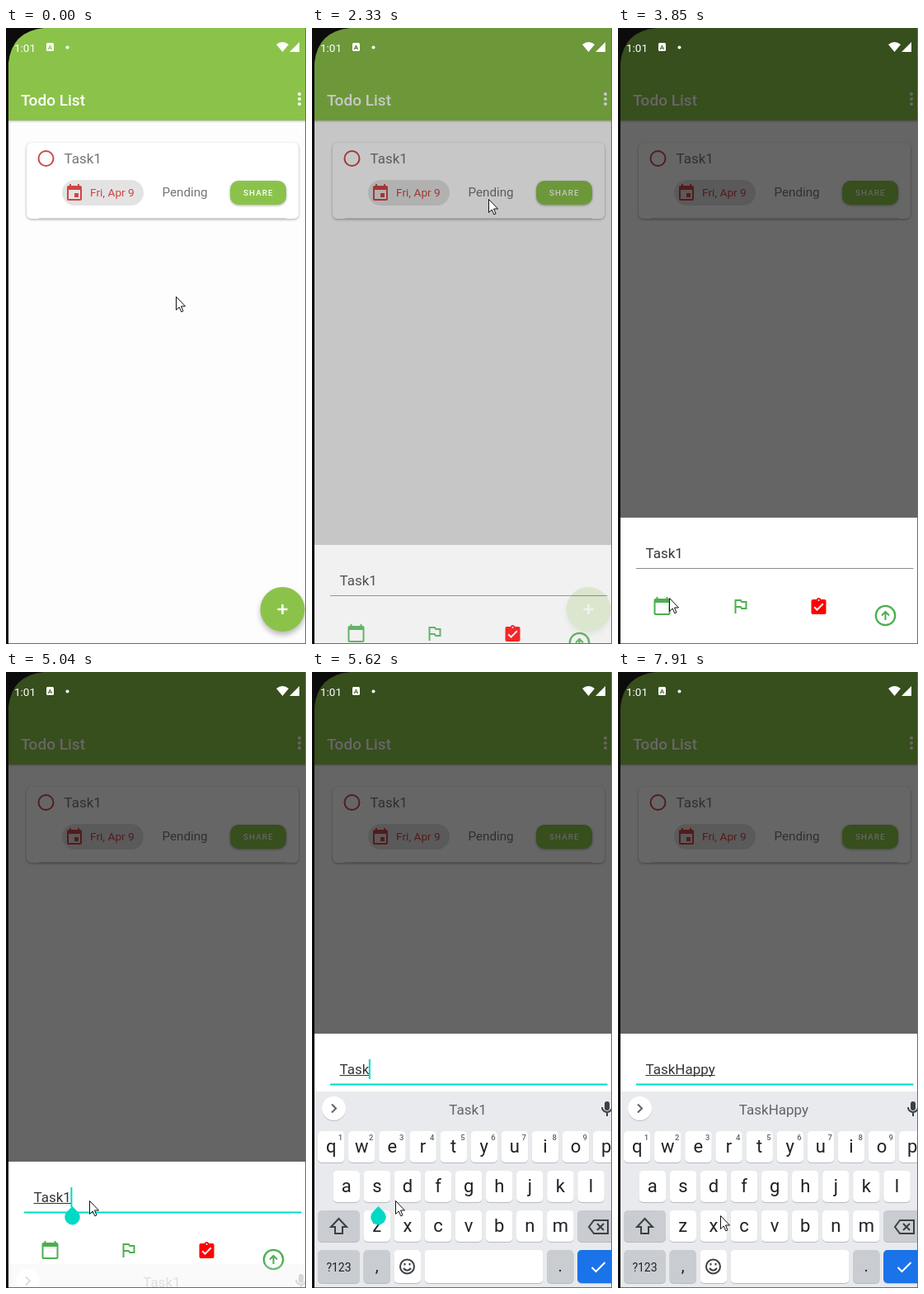
Write an HTML page that moves like this. It is 364x746 px and loops after 8 s.

```html
<!DOCTYPE html>
<html lang="en">
<head>
<meta charset="utf-8">
<title>Todo List</title>
<style>
  html, body { margin: 0; width: 100%; height: 100%; overflow: hidden; background: #0c0c0c; }
  svg { display: block; font-family: Roboto, sans-serif; }
  .card { filter: drop-shadow(0 1px 1.5px #0005); }
  .fab { filter: drop-shadow(0 4px 3px #0004); }
  .bar { filter: drop-shadow(0 1px 1px #0004); }
  .key { filter: drop-shadow(0 1px 0 #0003); }
  .line { fill: none; stroke-width: 2; }
  .mid { text-anchor: middle; }
</style>
</head>
<body>
<svg width="364" height="746" viewBox="0 0 364 746">
  <defs><clipPath id="screen"><path d="M3 0H363V745H3Z"/></clipPath></defs>
  <path fill="#6b6b6b" d="M3 0H364V746H3Z"/>
  <g clip-path="url(#screen)">
    <path fill="#fdfdfd" d="M3 0H363V745H3Z"/>
    <path class="bar" fill="#8bc34a" d="M0 0H364V112H0Z"/>
    <text x="18" y="93.5" font-size="19" font-weight="500" fill="#fff">Todo List</text>
    <g fill="#fff"><circle cx="356" cy="80" r="2"/><circle cx="356" cy="86" r="2"/><circle cx="356" cy="92" r="2"/></g>

    <rect class="card" x="25" y="139" width="330" height="92" rx="6" fill="#fff"/>
    <path d="M40 230.5H340" stroke="#d4d4d4"/>
    <circle class="line" cx="48.5" cy="158" r="9" stroke="#cd4a4a"/>
    <text x="70.5" y="164" font-size="17" fill="#757575">Task1</text>
    <rect x="68" y="184" width="99" height="31" rx="15.5" fill="#e3e3e3"/>
    <g fill="#d04545">
      <path transform="translate(71 188)" d="M17 12h-5v5h5zM16 1v2H8V1H6v2H5c-1.1 0-2 .9-2 2v14c0 1.1.9 2 2 2h14c1.1 0 2-.9 2-2V5c0-1.1-.9-2-2-2h-1V1zM19 19H5V8h14z"/>
      <text x="102" y="204" font-size="13.7">Fri, Apr 9</text>
    </g>
    <text x="189.5" y="204" font-size="15.2" fill="#757575">Pending</text>
    <rect class="card" x="272" y="185" width="68" height="29" rx="10" fill="#8bc34a"/>
    <text x="288" y="203" font-size="9.7" font-weight="500" letter-spacing="1.2" fill="#fff">SHARE</text>
    <circle class="fab" cx="335.5" cy="704" r="27" fill="#8bc34a"/>
    <path d="M329.5 704h12m-6-6v12" stroke="#fff" stroke-width="2.6"/>
    <path id="dim" d="M0 0H364V746H0Z"/>

    <g fill="#fff">
      <text x="10" y="28.5" font-size="13.5">1:01</text>
      <rect x="49" y="18" width="9" height="10" rx="1.5"/>
      <text id="badge" class="mid" x="53.5" y="26" font-size="8" font-weight="700">A</text>
      <circle cx="74.5" cy="23.5" r="2"/>
      <path d="M328 20Q335.5 14 343 20L335.5 29ZM356 17V29H344Z"/>
    </g>
    <path fill="#0c0c0c" d="M3 0H46Q7 4 3 42Z"/>

    <g id="sheet">
      <path id="sheetBack" fill="#fff" d="M3 593H363V760H3Z"/>
      <text id="input" x="33.5" y="641.5" font-size="17" fill="#333"></text>
      <path id="composing" stroke="#333"/>
      <path id="field"/>
      <path id="caret" fill="#00d9c5"/>
      <g fill="#4caf50">
        <path transform="translate(41.5 688)" d="M20 3h-1V1h-2v2H7V1H5v2H4c-1.1 0-2 .9-2 2v16c0 1.1.9 2 2 2h16c1.1 0 2-.9 2-2V5c0-1.1-.9-2-2-2zM20 21H4V8h16z"/>
        <path transform="translate(136.5 688)" d="M14 6l-1-2H5v17h2v-7h5l1 2h7V6zM18 14h-4l-1-2H7V6h5l1 2h5z"/>
        <path fill="#f00" transform="translate(231.5 689)" d="M19 3h-4.2a3 3 0 0 0-5.6 0H5c-1.1 0-2 .9-2 2v14c0 1.1.9 2 2 2h14c1.1 0 2-.9 2-2V5c0-1.1-.9-2-2-2zM12 3a1 1 0 0 1 0 2 1 1 0 0 1 0-2zM10 17l-4-4 1.4-1.4 2.6 2.6 6.6-6.6L18 9z"/>
      </g>
      <g class="line" stroke="#4caf50">
        <circle cx="324.5" cy="711.5" r="11.7" stroke-width="2.3"/>
        <path d="M324.5 717v-10m-4.5 4.5 4.5-4.5 4.5 4.5"/>
      </g>
    </g>

    <g id="keyboard">
      <path fill="#e8eaed" d="M3 508H363V746H3Z"/>
      <circle class="key" cx="26.5" cy="528.5" r="14.5" fill="#fff"/>
      <path class="line" d="M24 523.5l5 5-5 5" stroke="#5f6368"/>
      <g class="mid" font-size="17" fill="#5f6368">
        <text id="suggestion" x="189" y="535.5"></text>
        <g id="sides"><text x="96" y="535.5">Task has</text><text x="290.5" y="535.5">Tasha</text></g>
      </g>
      <rect x="355" y="520" width="6" height="11" rx="3" fill="#3c4043"/>
      <path class="line" d="M352 527a6 6 0 0 0 12 0m-6 6v5" stroke="#3c4043"/>
      <g id="keys"></g>
      <g class="line" stroke="#3c4043">
        <path d="M32.5 662l-9.5 10h5v8h9v-8h5z"/>
        <path d="M342 664h17v16H342l-6-8zM346 668l8 8m0-8-8 8"/>
        <circle cx="115.5" cy="720" r="8.5"/>
        <path d="M111 722q4.5 5.5 9 0M112.5 716v2.5m6-2.5v2.5"/>
        <path d="M339.500 721l5 5 11-11" stroke="#fff"/>
      </g>
    </g>
    <path id="handle" fill="#00d9c5" d="M80.500 647l6.200 6.200a9.300 9.300 0 1 1-12.400 0z"/>
    <path id="mouse" fill="#fff" stroke="#111" d="M.5.5V16.500L4.200 13 6.800 18.800 9 17.800 6.500 12H11.500Z"/>
  </g>
</svg>
<script>
const LOOP = 8000;
const $ = id => document.getElementById(id);

// Each track lists [start time, value...]; a value holds until the next start.
const tracks = {
  mouse: [[0, 206, 325], [570, 199, 262], [690, 206, 222], [840, 211, 210], [960, 214, 207],
    [2910, 156, 435], [3060, 122, 585], [3180, 107, 650], [3330, 71, 702], [3480, 64, 698],
    [3600, 65, 693], [3850, 62, 690], [3970, 74, 668], [4090, 90, 647], [4240, 101, 640], [7910, 124, 658]],
  dim: [[0, 0], [2330, .22], [2480, .55], [2600, .6]],
  sheet: [[0, 200], [2330, 33], [2480, 0], [5620, -155]],
  keyboard: [[0, 240, 0], [5040, 209, .2], [5190, 0, 1]],
  input: [[0, 'Task1'], [5620, 'Task'], [6480, 'TaskH'], [6630, 'TaskHa'], [6780, 'TaskHap'], [7050, 'TaskHappy']],
  composed: [[0, 0], [4740, 5], [5620, 4], [6480, 5], [6630, 6], [6780, 7], [7050, 8], [7360, 9]],
  suggestion: [[0, 'Task1'], [5740, 'Task'], [6630, 'TaskH'], [6780, 'TaskHa'], [6900, 'TaskHap'],
    [7050, 'TaskHapp'], [7360, 'TaskHappy']],
  caret: [[0, 0], [4610, 1], [6170, 0], [6480, 1], [7760, 0]]
};
const at = (name, t) => tracks[name].findLast(step => step[0] <= t).slice(1);
const show = (id, on) => $(id).setAttribute('visibility', on ? 'visible' : 'hidden');
const set = (id, name, value) => $(id).setAttribute(name, value);

function key(x, y, width, label = '', fill = '#fff', size = 22, hint = '') {
  const height = y < 700 ? 38 : 40;
  return `<rect class="key" x="${x}" y="${y}" width="${width}" height="${height}" rx="5" fill="${fill}"/>
    <text class="mid" x="${x + width / 2}" y="${y + 26}" font-size="${size}" fill="#202124">${label}</text>
    <text class="mid" x="${x + 27.5}" y="${y + 10.5}" font-size="9.5" font-weight="500" fill="#5f6368">${hint}</text>`;
}

function buildKeys() {
  const grey = '#c9ccd1', pitch = 37.1;
  const rows = [['qwertyuiop', 7, 556], ['asdfghjkl', 25.5, 604], ['zxcvbnm', 62.500, 652]];
  let keys = rows.map(([letters, x, y]) => [...letters].map((letter, i) =>
    key(x + i * pitch, y, 32.5, letter, '#fff', 22, y === 556 ? (i + 1) % 10 : '')).join('')).join('');
  keys += key(7, 652, 51, '', grey) + key(322, 652, 51, '', grey);
  keys += key(7, 700, 51, '?123', grey, 14) + key(62.5, 700, 32.5, ',', grey, 20) + key(99.5, 700, 32.5);
  keys += key(136.5, 700, 144) + key(285, 700, 32.5, '.', grey, 20) + key(322, 700, 51, '', '#1a73e8');
  $('keys').innerHTML = keys;
}

function draw(t) {
  const [dim] = at('dim', t), [sheetY] = at('sheet', t);
  const [keyboardY, keyboardAlpha] = at('keyboard', t);
  const [input] = at('input', t), [composed] = at('composed', t);
  const focused = t >= 4610;

  set('mouse', 'transform', `translate(${at('mouse', t)})`);
  set('dim', 'opacity', dim);
  set('badge', 'fill', dim ? '#4a6a26' : '#8bc34a');
  set('sheet', 'transform', `translate(0 ${sheetY})`);
  set('sheet', 'opacity', t < 2480 ? .8 : 1);
  set('sheetBack', 'opacity', t < 2480 ? .94 : 1);
  set('keyboard', 'transform', `translate(0 ${keyboardY})`);
  set('keyboard', 'opacity', keyboardAlpha);

  $('input').textContent = input;
  $('suggestion').textContent = at('suggestion', t)[0];
  const end = 33.5 + $('input').getComputedTextLength();
  const lineEnd = composed ? 33.5 + $('input').getSubStringLength(0, composed) : 33.5;
  set('composing', 'd', `M33.5 643.5H${lineEnd}`);
  set('caret', 'd', `M${end - .5} 624h2v24h-2z`);
  set('field', 'd', focused ? 'M22 654.5H358.5' : 'M22 654.5H358.5');
  set('field', 'stroke', focused ? '#00d9c5' : '#8c8c8c');
  set('field', 'stroke-width', focused ? 2 : 1);
  show('caret', at('caret', t)[0]);
  show('handle', t >= 4740 && t < 5740);
  show('sides', t >= 6630 && t < 6780);
}

function frame() {
  draw(performance.now() % LOOP);
  requestAnimationFrame(frame);
}

buildKeys();
frame();
</script>
</body>
</html>
```
